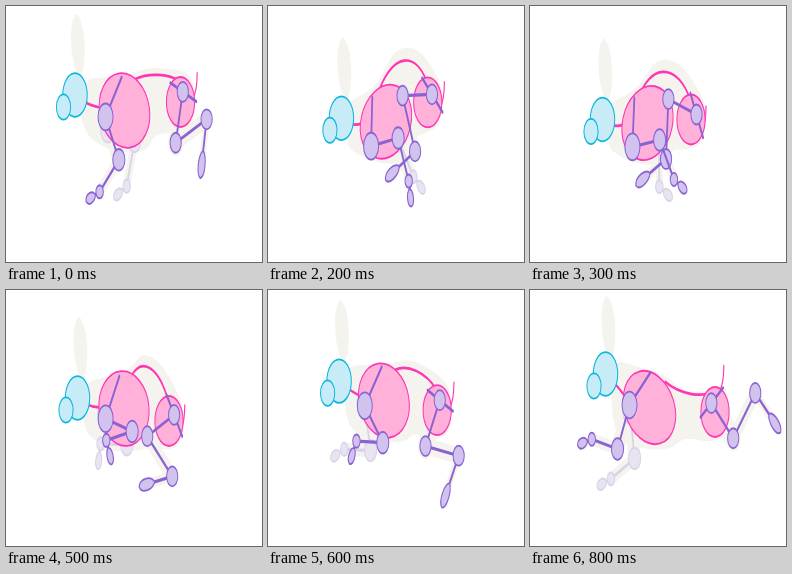
Write an HTML page with a canvas that moves like this. It is 256 by 256 pixels and loops after 0.9 s.

```html
<!DOCTYPE html>
<html lang="en">
<head>
<meta charset="utf-8">
<title>Running hare skeleton</title>
<style>
html, body { margin: 0; width: 100%; height: 100%; overflow: hidden; background: #fff; }
canvas { display: block; width: 100vw; height: 100vh; }
</style>
</head>
<body>
<canvas id="stage"></canvas>
<script>
const SIZE = 256, STEP = 100, STEPS = 9;
const SQUASH = 0.56;  // the whole figure is narrowed horizontally
const FAR_LEAD = 0.7; // the far foreleg runs ahead of the near one, in steps

const SKIN = '#f4f3ee';
const PINK = { fill: '#ffb1da', line: '#ff36b3' };
const CYAN = { fill: '#c7ecf8', line: '#0bb8dc' };
const NEAR = { fill: '#d2c2ee', line: '#8a63d2' };
const FAR = { fill: '#e9e4f1', line: '#dad3e7' };

// Gait key poses: three anchors, and one direction in degrees per bone.
const KEYS = [0, 1, 3, 5, 7, 8];
const anchors = {
  head: { x: [69, 73.5, 72.5, 71.5, 71.5, 75.5], y: [89, 107, 113.5, 108, 75, 84] },
  rib: { x: [118.5, 118.5, 117.5, 118, 114.5, 119.5], y: [104.5, 113, 117, 118.5, 104, 117.5] },
  pelvis: { x: [174.5, 161, 161, 163, 177, 185], y: [96, 82.5, 113.5, 131, 108.5, 122] }
};
const angles = {
  blade: [36, 9, 4, 30, 44, 49], // lean from the vertical
  humerus: [61, 2, -8, 15, 88, 116],
  forearm: [137, 98, 57, 169, 183, 192],
  hand: [159, 143, 28, 67, 170, 167],
  pitch: [22, 21, 63, 56, -12, -36],
  femur: [104, 146, 197, 156, 78, 42],
  tibia: [-23, 25, 94, 42, -24, -49],
  foot: [101, 144, 154, 170, 61, 41]
};

const canvas = document.getElementById('stage');
const ctx = canvas.getContext('2d');

const rad = deg => deg * Math.PI / 180;
const shift = (p, dx, dy) => [p[0] + dx, p[1] + dy];
const mix = (a, b, t) => [a[0] + (b[0] - a[0]) * t, a[1] + (b[1] - a[1]) * t];
const bone = (p, deg, length) =>
  shift(p, Math.cos(rad(deg)) * length * SQUASH, Math.sin(rad(deg)) * length);

// Cyclic cubic Hermite through unevenly spaced keys.
function sample(track, step) {
  const n = KEYS.length, s = step % STEPS;
  const time = i => KEYS[(i + n) % n] + STEPS * Math.floor(i / n);
  const val = i => track[(i + n) % n];
  const slope = i => (val(i + 1) - val(i - 1)) / (time(i + 1) - time(i - 1));
  let i = n - 1;
  while (KEYS[i] > s) i--;
  const span = time(i + 1) - time(i);
  const u = (s - time(i)) / span, v = 1 - u;
  return val(i) * v * v * (1 + 2 * u) + val(i + 1) * u * u * (1 + 2 * v)
    + span * u * v * (slope(i) * v - slope(i + 1) * u);
}

const anchor = (name, step) => [sample(anchors[name].x, step), sample(anchors[name].y, step)];
const angle = (name, step) => sample(angles[name], step);

function poseFore(rib, step) {
  const lean = angle('blade', step);
  const center = shift(rib, 0.1 * lean - 14.5, 1 - 0.4 * lean);
  const blade = bone(center, lean + 90, -24.5);
  const shoulder = bone(center, lean + 90, 24.5);
  const elbow = bone(shoulder, angle('humerus', step), 49);
  const wrist = bone(elbow, angle('forearm', step), 47);
  const tip = bone(wrist, angle('hand', step), 26);
  return { blade, shoulder, elbow, wrist, paw: mix(wrist, tip, 0.3), tip };
}

function poseHind(pelvis, step) {
  const pitch = angle('pitch', step);
  const hip = bone(pelvis, pitch - 90, 11);
  const knee = bone(hip, angle('femur', step), 52.5);
  const ankle = bone(knee, angle('tibia', step), 60);
  const tip = bone(ankle, angle('foot', step), 60);
  return {
    barA: bone(hip, pitch, -24), barB: bone(hip, pitch, 26),
    hip, knee, ankle, paw: mix(ankle, tip, 0.53), tip,
    tail: bone(pelvis, pitch - 32, 23)
  };
}

// The spine keeps its length: it arches as rib and pelvis close in, and sags as they part.
function poseSpine(rib, pelvis, lean) {
  const exit = rad(10 - 2 * lean + 32);
  const start = shift(rib, Math.sin(exit) * 23, -Math.cos(exit) * 35);
  const end = shift(pelvis, -1, -21);
  const arch = 1.75 * (60 - pelvis[0] + rib[0]);
  return {
    start, end,
    bendA: shift(mix(start, end, 0.3), 0, -arch),
    bendB: shift(mix(start, end, 0.75), 0, -arch)
  };
}

// Strokes with the squashed pen: flat lines come out thicker than upright ones.
function stroke(color, width) {
  ctx.save();
  ctx.scale(SQUASH, 1);
  ctx.strokeStyle = color;
  ctx.lineWidth = width;
  ctx.stroke();
  ctx.restore();
}

function fill(color) {
  ctx.fillStyle = color;
  ctx.fill();
}

function line(color, width, ...points) {
  ctx.beginPath();
  points.forEach(p => ctx.lineTo(...p));
  stroke(color, width);
}

function oval(p, rx, ry, style, tilt = 0) {
  ctx.beginPath();
  ctx.ellipse(...p, rx, ry, rad(tilt), 0, Math.PI * 2);
  fill(style.fill);
  stroke(style.line, 1.8);
}

const joint = (p, r, style) => oval(p, r * SQUASH, r, style);

function leaf(a, b, w) {
  const dx = (b[0] - a[0]) / SQUASH, dy = b[1] - a[1];
  const len = Math.hypot(dx, dy);
  const side = (t, k) => shift(mix(a, b, t), -dy / len * w * k * SQUASH, dx / len * w * k);
  ctx.beginPath();
  ctx.moveTo(...a);
  ctx.bezierCurveTo(...side(0.2, 1), ...side(0.9, 1), ...b);
  ctx.bezierCurveTo(...side(0.9, -1), ...side(0.2, -1), ...a);
  ctx.closePath();
}

function blob(points) {
  const next = i => points[(i + 1) % points.length];
  ctx.beginPath();
  points.forEach((p, i) => ctx.quadraticCurveTo(...p, ...mix(p, next(i), 0.5)));
  ctx.quadraticCurveTo(...points[0], ...mix(points[0], points[1], 0.5));
  ctx.closePath();
}

function drawSkin(head, rib, pelvis, spine, fore, far, hind) {
  const ear = [head[0] + 1, Math.max(6, head[1] - 81)];
  leaf(shift(ear, 4, 64), ear, 16);
  fill(SKIN);
  blob([
    shift(head, 5, -16), shift(mix(head, spine.start, 0.5), 6, -10), shift(spine.start, 0, -7),
    shift(spine.bendA, 0, -5), shift(spine.bendB, 2, -5), shift(spine.end, 9, -9),
    shift(pelvis, 15, -12), shift(pelvis, 14, 22), shift(pelvis, -3, 31),
    shift(mix(rib, pelvis, 0.5), 2, 27), shift(rib, 22, 42), shift(rib, -8, 42),
    shift(rib, -34, 30), shift(head, 5, 24)
  ]);
  fill(SKIN);
  line(SKIN, 26, hind.hip, hind.knee);
  line(SKIN, 17, hind.knee, hind.ankle);
  line(SKIN, 11, hind.ankle, hind.paw);
  for (const leg of [fore, far]) {
    line(SKIN, 22, leg.shoulder, leg.elbow);
    line(SKIN, 13, leg.elbow, leg.wrist);
  }
}

function drawPaw(leg, w, style) {
  leaf(leg.paw, leg.tip, w);
  fill(style.fill);
  stroke(style.line, 1.9);
}

function drawFore(leg, style) {
  line(style.line, 3.2, leg.shoulder, leg.elbow, leg.wrist, leg.paw);
  drawPaw(leg, 7, style);
  joint(leg.shoulder, 13.4, style);
  joint(leg.elbow, 10.8, style);
  joint(leg.wrist, 6.6, style);
}

function drawHind(leg) {
  line(NEAR.line, 3.2, leg.barA, leg.barB);
  line(NEAR.line, 3.2, leg.hip, leg.knee, leg.ankle, leg.paw);
  drawPaw(leg, 8, NEAR);
  for (const p of [leg.hip, leg.knee, leg.ankle]) joint(p, 10, NEAR);
}

function drawSpine(head, rib, spine, tail) {
  ctx.beginPath();
  ctx.moveTo(...head);
  ctx.quadraticCurveTo(...shift(head, 13, 12), ...shift(rib, -18, -2));
  ctx.moveTo(...spine.start);
  ctx.bezierCurveTo(...spine.bendA, ...spine.bendB, ...spine.end);
  stroke(PINK.line, 2.7);
  ctx.beginPath();
  ctx.moveTo(...tail);
  ctx.quadraticCurveTo(...shift(tail, 4, -8), ...shift(tail, 4, -25));
  stroke(PINK.line, 2);
}

function draw(step) {
  const head = anchor('head', step), rib = anchor('rib', step), pelvis = anchor('pelvis', step);
  const lean = angle('blade', step);
  const fore = poseFore(rib, step), far = poseFore(rib, step + FAR_LEAD);
  const hind = poseHind(pelvis, step);
  const spine = poseSpine(rib, pelvis, 14 - 0.62 * lean + 16);

  ctx.fillStyle = '#fff';
  ctx.fillRect(0, 0, SIZE, SIZE);
  drawSkin(head, rib, pelvis, spine, fore, far, hind);
  drawFore(far, FAR);
  drawSpine(head, rib, spine, hind.tail);
  oval(rib, 25, 37.5, PINK, 14 - 0.62 * lean);
  oval(pelvis, 14.1, 25, PINK);
  joint(head, 21.8, CYAN);
  joint(shift(head, -11.5, 12), 12.7, CYAN);
  drawHind(hind);
  line(NEAR.line, 3.2, fore.blade, fore.shoulder);
  drawFore(fore, NEAR);
}

function resize() {
  const w = Math.round(innerWidth * devicePixelRatio);
  const h = Math.round(innerHeight * devicePixelRatio);
  if (canvas.width !== w || canvas.height !== h) {
    canvas.width = w;
    canvas.height = h;
  }
  ctx.setTransform(w / SIZE, 0, 0, h / SIZE, 0, 0);
  ctx.lineCap = ctx.lineJoin = 'round';
}

function tick() {
  resize();
  draw(Math.floor(performance.now() / STEP) % STEPS);
  requestAnimationFrame(tick);
}
tick();
</script>
</body>
</html>
```
